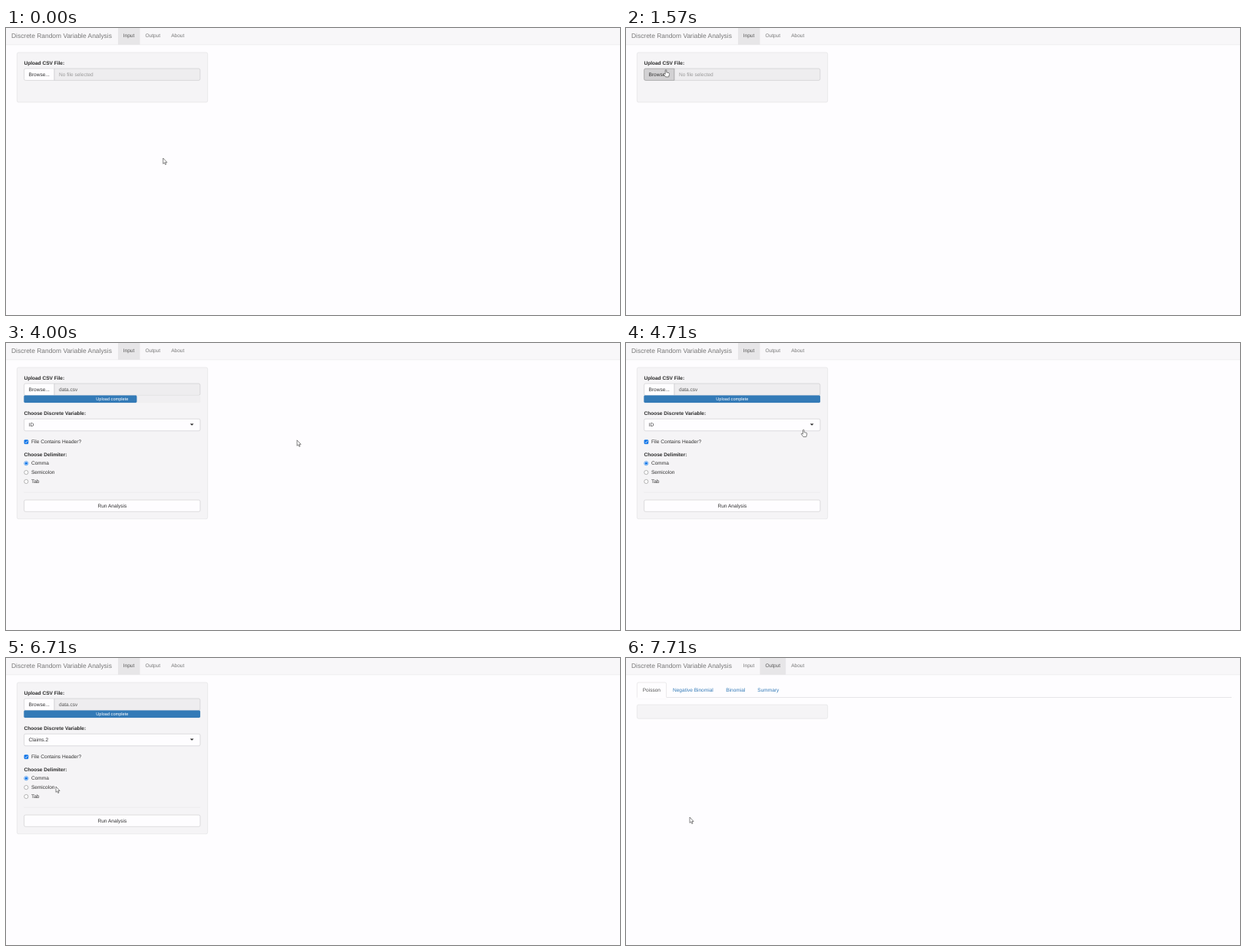
Animation of 800 by 375 pixels, one loop 8000 ms. Source, as an HTML page with a canvas:

```html
<!DOCTYPE html>
<html lang="en">
<head>
<meta charset="utf-8">
<title>Discrete Random Variable Analysis</title>
<style>
html, body { margin: 0; width: 100%; height: 100%; overflow: hidden; background: #fefdff; }
canvas { display: block; }
</style>
</head>
<body>
<canvas id="stage" width="800" height="375"></canvas>
<script>
const g = document.getElementById('stage').getContext('2d');
const LOOP = 8000, STEP = 1000 / 7;
const BASE = 6.566, WHITE = '#fefdff', LINE = '#c8c8ca', BLUE = '#337ab7';

// Pointer stops: [step, x, y]
const stops = [
  [0, 204.7, 170], [2, 212, 178], [3, 202, 167], [8, 53, 55.5], [9, 52, 54.3], [15, 52, 54.3],
  [16, 50, 55], [18, 50, 55], [20, 338.7, 114.7], [23, 391, 128], [27, 391, 128], [33, 231.3, 113],
  [35, 229, 112.5], [41, 82.8, 148], [43, 82.8, 148], [47, 65, 168], [50, 76, 198], [51, 83, 208], [56, 83, 208]
];

function pointerAt(k) {
  const i = Math.max(1, stops.findIndex(s => s[0] >= k));
  const [k0, x0, y0] = stops[i - 1], [k1, x1, y1] = stops[i];
  const p = (k - k0) / (k1 - k0), e = p * p * (3 - 2 * p);
  return [x0 + (x1 - x0) * e, y0 + (y1 - y0) * e];
}

function text(s, x, y, color = '#333', { size = BASE, weight = 400, align = 'left' } = {}) {
  g.font = `${weight} ${size}px "Liberation Sans", Arial, sans-serif`;
  g.textRendering = 'geometricPrecision';
  g.textAlign = align;
  g.fillStyle = color;
  g.fillText(s, x, y + size * 0.35);
}

const label = (s, y) => text(s, 23.4, y, '#2b2b2b', { weight: 700 });

function rect(x, y, w, h, fill) {
  g.fillStyle = fill;
  g.fillRect(x, y, w, h);
}

function box(x, y, w, h, fill, stroke, radii = 1.9, width = 0.6) {
  g.beginPath();
  g.roundRect(x, y, w, h, radii);
  g.fillStyle = fill;
  g.fill();
  g.strokeStyle = stroke;
  g.lineWidth = width;
  g.stroke();
}

function poly(points, fill) {
  g.beginPath();
  points.forEach(p => g.lineTo(...p));
  g.closePath();
  g.fillStyle = fill;
  g.fill();
}

// dir: 1 points down, -1 points up
const caret = (x, y, r, dir, color) =>
  poly([[x - r, y - dir * r / 2], [x + r, y - dir * r / 2], [x, y + dir * r / 2]], color);

const well = (y, h) => box(14.4, y, 248.3, h, '#f5f4f6', '#dfdfe1');

function navbar(active) {
  rect(0, 0, 800, 21.7, '#f8f7f9');
  rect(0, 21.6, 800, 0.6, '#e5e4e6');
  text('Discrete Random Variable Analysis', 7, 10.2, '#777', { size: 8.44 });
  const [x, w] = active === 'Input' ? [146, 28.5] : [174.5, 33.7];
  rect(x, 0, w, 21.9, '#e7e6e8');
  [['Input', 152.7], ['Output', 181.4], ['About', 215.2]]
    .forEach(([s, tx]) => text(s, tx, 10.2, s === active ? '#555' : '#777'));
}

function fileInput(k) {
  label('Upload CSV File:', 45.4);
  const loaded = k >= 27, pressed = k === 11 || k === 12, lit = k >= 8 && !loaded;
  box(62.8, 53, 190.1, 15.4, '#eeedef', LINE, [0, 1.9, 1.9, 0]);
  text(loaded ? 'data.csv' : 'No file selected', 69, 60.5, loaded ? '#555' : '#999');
  box(23.6, 53, 39.2, 15.4, pressed ? '#d2d1d3' : lit ? '#e7e6e8' : WHITE,
    pressed ? '#8c8c8c' : lit ? '#b5b5b7' : LINE, [1.9, 0, 0, 1.9]);
  text('Browse...', 29.5, 60.5);
  if (!loaded) return;
  const p = Math.min(1, (k - 26) / 5);
  box(23.4, 68.6, 229.6, 9.4, '#f0eff1', '#e8e7e9', 1.4, 0.2);
  box(23.4, 68.6, 229.6 * (1 - (1 - p) ** 2), 9.4, BLUE, BLUE, 1.4, 0.2);
  text('Upload complete', 138.3, 72.9, '#fff', { size: 5.63, align: 'center' });
}

function radio(y, on) {
  g.beginPath();
  g.arc(26.3, y, 2.6, 0, 7);
  g.fillStyle = '#fff';
  g.fill();
  g.strokeStyle = on ? '#0b72e7' : '#858585';
  g.lineWidth = 0.6;
  g.stroke();
  if (!on) return;
  g.beginPath();
  g.arc(26.3, y, 1.6, 0, 7);
  g.fillStyle = '#0b72e7';
  g.fill();
}

function options(k) {
  const open = k >= 35 && k < 43;
  label('Choose Discrete Variable:', 91.7);
  if (open) {
    g.shadowColor = 'rgba(102,175,233,.35)';
    g.shadowBlur = 3;
  }
  box(23.6, 99.2, 229.4, 15.6, WHITE, open ? '#66afe9' : LINE);
  g.shadowBlur = 0;
  text(k >= 43 ? 'Claims.2' : 'ID', 29.6, 106.8);
  caret(242.2, 106.6, 2.4, open ? -1 : 1, '#222');

  box(23.9, 126.7, 5, 5, '#0b72e7', '#0b72e7', 0.8, 0.6);
  g.beginPath();
  [[24.9, 129.3], [26, 130.5], [28, 127.9]].forEach(p => g.lineTo(...p));
  g.strokeStyle = '#fff';
  g.lineWidth = 0.8;
  g.stroke();
  text('File Contains Header?', 32.9, 129);

  label('Choose Delimiter:', 145.3);
  ['Comma', 'Semicolon', 'Tab'].forEach((s, i) => {
    const y = 156.9 + i * 11.9;
    radio(y + 0.3, i === 0);
    text(s, 32.9, y);
  });
  rect(23.4, 194.8, 229.6, 0.6, '#e6e5e7');

  box(23.6, 205.1, 229.4, 15.2, k >= 52 ? '#d4d3d5' : k === 51 ? '#e7e6e8' : WHITE, k >= 51 ? '#adadad' : LINE);
  text('Run Analysis', 138.4, 212.6, '#333', { align: 'center' });
  if (open) dropdown(k);
}

function dropdown(k) {
  const [, py] = pointerAt(k);
  g.shadowColor = 'rgba(0,0,0,.2)';
  g.shadowBlur = 5;
  g.shadowOffsetY = 2.5;
  box(23.6, 116.2, 229.4, 94.3, WHITE, '#c8c8ca');
  g.shadowBlur = g.shadowOffsetY = 0;
  g.save();
  g.beginPath();
  g.rect(24, 116.5, 228.7, 93.6);
  g.clip();
  ['ID', 'Claims.1', 'Claims.2', 'Claims.3', 'Loss.1', 'Loss.2', 'Loss.3', 'Loss.4'].forEach((s, i) => {
    const y = 124.4 + i * 12.05;
    if (Math.abs(py - y) < 6.02) rect(24, y - 6, 220.5, 12, '#f4f3f5');
    text(s, 29.6, y);
  });
  rect(244.5, 117.5, 8, 92.5, '#f1f0f2');
  rect(245, 125, 7, 41.3, '#c1c0c2');
  caret(248.5, 121.2, 1.8, -1, '#999');
  caret(248.5, 205.8, 1.8, 1, '#444');
  g.restore();
}

function output() {
  rect(14, 51, 775, 0.7, '#dddcde');
  box(14.4, 32, 38.2, 21, WHITE, '#dddcde', [1.9, 1.9, 0, 0]);
  rect(13.5, 51.6, 40, 2, WHITE);
  [['Poisson', 21.7], ['Negative Binomial', 61], ['Binomial', 130.2], ['Summary', 171.3]]
    .forEach(([s, x], i) => text(s, x, 41.4, i ? BLUE : '#555'));
  well(61, 18.2);
}

const arrow = new Path2D('M0 0V7.4L1.7 5.9L2.8 8.5L4 8L2.9 5.5H5.1Z');
const hand = new Path2D('M-.8 .7Q0-.3 .8 .7V3.7L4 4.4Q4.6 4.7 4.5 6L3.6 9.6H-.3L-2.9 6.1Q-3.1 4.9-1.8 5.2L-.8 6.2Z');

function pointer(k) {
  const [x, y] = pointerAt(k);
  const over = (x0, y0, x1, y1) => x > x0 && x < x1 && y > y0 && y < y1;
  const dialog = k >= 16 && k <= 18;
  const clickable = k < 53 && !dialog && (over(23, 53, 63, 69) ||
    (k >= 28 && (over(23, 99, 253, 115) || over(23, 205, 253, 221))));
  const shape = clickable ? hand : arrow;
  g.save();
  g.translate(x, y);
  g.fillStyle = '#fff';
  g.strokeStyle = '#444';
  g.lineWidth = 0.65;
  g.lineJoin = 'round';
  g.fill(shape);
  g.stroke(shape);
  g.restore();
}

function draw(now) {
  // The screen updates seven times a second.
  const k = Math.min(54, Math.floor((now % LOOP + 5) / STEP));
  rect(0, 0, 800, 375, WHITE);
  const done = k >= 53;
  navbar(done ? 'Output' : 'Input');
  if (done) output();
  else {
    well(32, k >= 28 ? 197.8 : k === 27 ? 74 : 65);
    fileInput(k);
    if (k >= 28) options(k);
  }
  pointer(k);
  requestAnimationFrame(draw);
}
requestAnimationFrame(draw);
</script>
</body>
</html>
```
